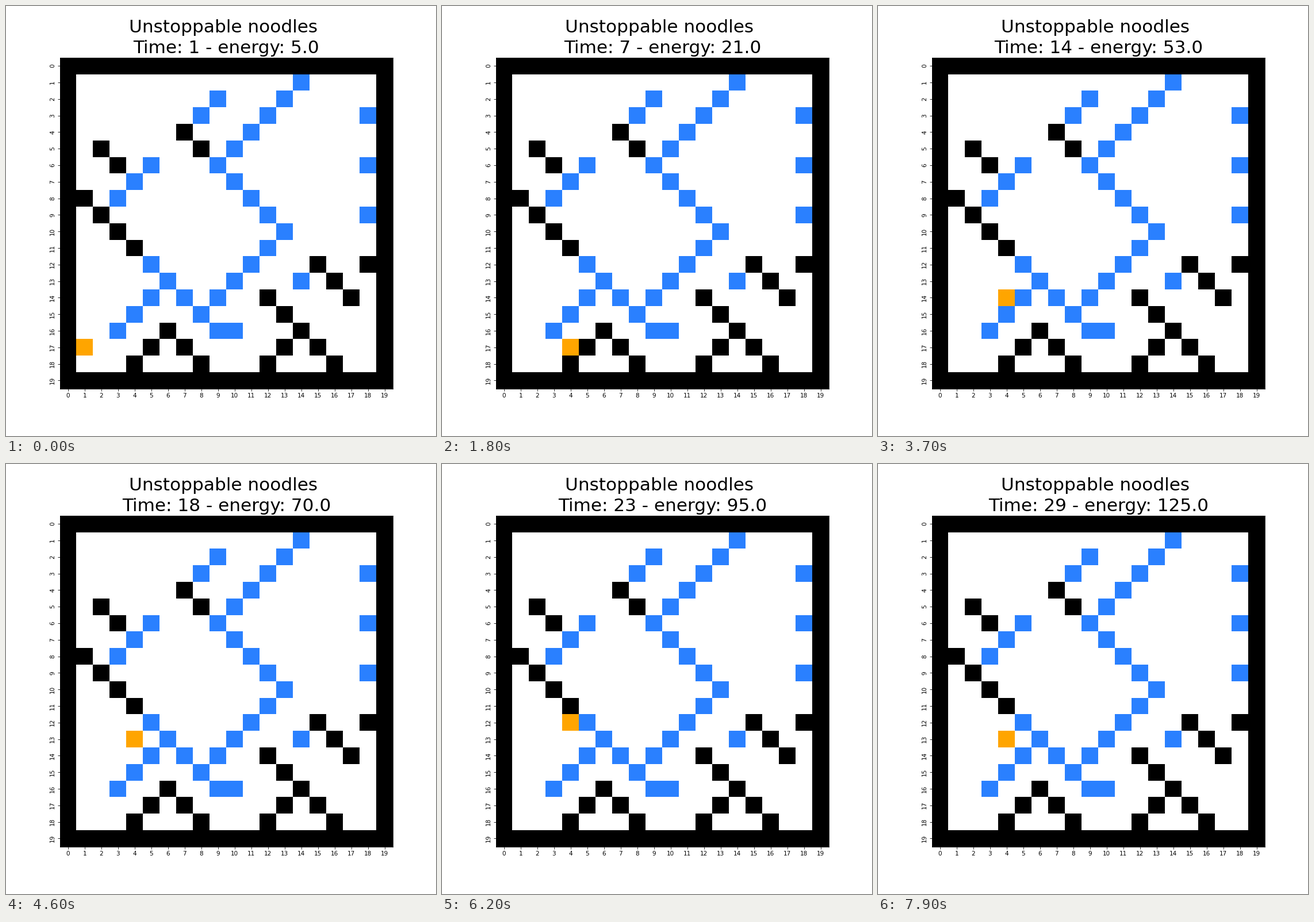
Write a matplotlib script that moves like this. It is 748x748 px and loops after 8 s.

```python
import numpy as np
import matplotlib.pyplot as plt
from matplotlib.animation import FuncAnimation
from matplotlib.colors import ListedColormap

SIZE = 20
PX = 748
FRAMES, STEP_MS = 80, 100
HALF_MS, LEAD_MS = 138, 92
EMPTY, WALL, FOOD, NOODLE = range(4)
COLORS = ["white", "black", "#2a80ff", "orange"]

# corners (row, column) of the chains of cells
FOOD_CHAINS = [[(1, 14), (6, 9), (10, 13), (15, 8), (12, 5)],
               [(15, 8), (16, 9), (16, 10)],
               [(2, 9), (3, 8)], [(6, 5), (8, 3)], [(14, 5), (16, 3)],
               [(13, 14)]]
WALL_CHAINS = [[(4, 7), (5, 8)], [(5, 2), (6, 3)], [(8, 1), (11, 4)],
               [(12, 15), (14, 17)], [(12, 18)], [(14, 12), (18, 16)],
               [(16, 14), (18, 12)], [(18, 4), (16, 6), (18, 8)]]


def fill_chain(board, corners, kind):
    board[corners[0]] = kind
    for (r0, c0), (r1, c1) in zip(corners, corners[1:]):
        count = max(abs(r1 - r0), abs(c1 - c0)) + 1
        rows = np.linspace(r0, r1, count).round().astype(int)
        cols = np.linspace(c0, c1, count).round().astype(int)
        board[rows, cols] = kind


def build_board():
    board = np.full((SIZE, SIZE), WALL)
    board[1:-1, 1:-1] = EMPTY
    board[3:10:3, 18] = FOOD
    for chain in FOOD_CHAINS:
        fill_chain(board, chain, FOOD)
    for chain in WALL_CHAINS:
        fill_chain(board, chain, WALL)
    return board


def noodle_cell(move):
    """Crawl along the floor, climb, then wobble in the pocket."""
    if move > 16:
        return 13 + round(np.sin(11 * np.pi / 12 * (move - 17))), 4
    times = [0, 1, 4, 5, 6, 9, 10, 16]
    row = np.interp(move, times, [17, 18, 18, 17, 17, 17, 16, 13])
    col = np.interp(move, times, [1, 1, 3, 3, 4, 4, 4, 4])
    return round(row), round(col)


def energy(tick):
    return round(np.interp(tick, [0, 3, 6, 10, 17, 28],
                           [5, 14, 21, 41, 70, 125]))


BOARD = build_board()

fig = plt.figure(figsize=(10, 10), dpi=PX / 10, facecolor="white")
ax = fig.add_axes([0.125, 0.11, 0.775, 0.77])
mesh = ax.pcolormesh(BOARD, cmap=ListedColormap(COLORS), vmin=-0.5, vmax=3.5)
ax.set_xlim(0, SIZE)
ax.set_ylim(SIZE, 0)
ax.set_xticks(np.arange(SIZE) + 0.5, range(SIZE))
ax.set_yticks(np.arange(SIZE) + 0.5, range(SIZE), rotation="vertical",
              va="center")
ax.tick_params(labelsize=10)

fig.text(214 / PX, 1 - 45.5 / PX, "Unstoppable noodles", fontsize=30,
         ha="left", va="baseline")
title = ax.set_title("", fontsize=30, pad=7.5)


def draw(frame):
    # each tick has two halves: the counter advances, then the noodle moves
    half = (frame * STEP_MS + LEAD_MS) // HALF_MS
    tick = half // 2
    board = BOARD.copy()
    board[noodle_cell((half + 1) // 2)] = NOODLE
    mesh.set_array(board)
    title.set_text(f"Time: {tick + 1} - energy: {energy(tick):.1f}")
    return mesh, title


anim = FuncAnimation(fig, draw, frames=FRAMES, interval=STEP_MS,
                     init_func=lambda: draw(0), repeat=True, repeat_delay=0)
plt.show()
```
